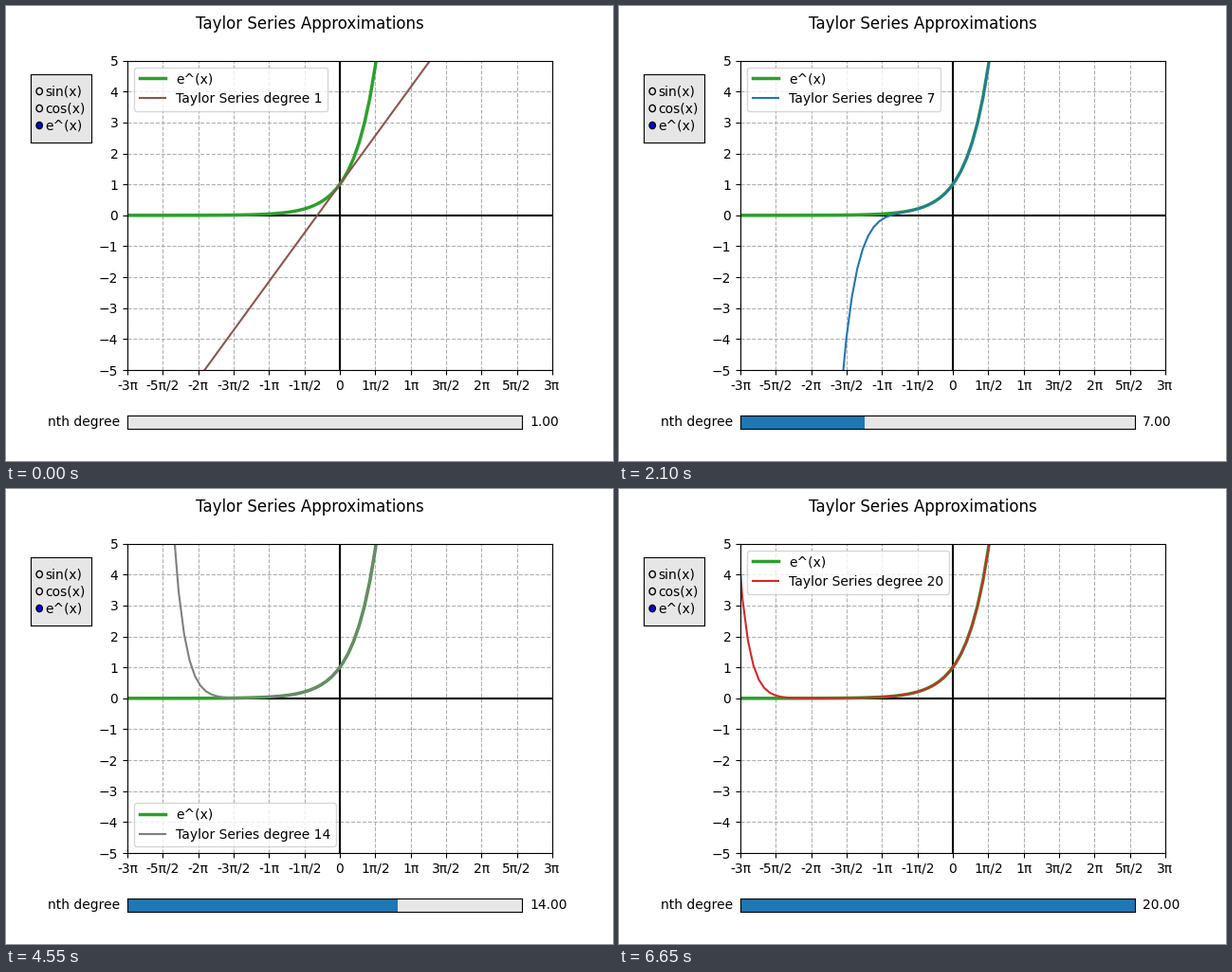
These frames come from a looping animation (640x480 px, 7 s). A matplotlib script:

```python
import math

import matplotlib.pyplot as plt
import numpy as np
from matplotlib.animation import FuncAnimation
from matplotlib.patches import Circle, Rectangle

MAX_DEGREE = 20
GREY = "0.9"

x = np.linspace(-12, 12, 100)


def taylor_exp(degree):
    return sum(x**k / math.factorial(k) for k in range(degree + 1))


def pi_label(halves):
    """Name of a multiple of pi/2."""
    if halves == 0:
        return "0"
    return f"{halves // 2}π" if halves % 2 == 0 else f"{halves}π/2"


def panel(rect):
    """Grey box without ticks, in unit coordinates."""
    box = fig.add_axes(rect, facecolor=GREY)
    box.set(xlim=(0, 1), ylim=(0, 1), xticks=[], yticks=[])
    return box


fig = plt.figure(figsize=(6.4, 4.8), dpi=100)
fig.suptitle("Taylor Series Approximations")

ax = fig.add_axes([0.2, 0.2, 0.7, 0.68])
halves = range(-6, 7)
ax.set(xlim=(-3 * np.pi, 3 * np.pi), ylim=(-5, 5), yticks=range(-5, 6))
ax.set_xticks([h * np.pi / 2 for h in halves], [pi_label(h) for h in halves])
ax.grid(linestyle="--")
ax.axhline(0, color="black")
ax.axvline(0, color="black")
ax.plot(x, np.exp(x), color="C2", linewidth=2.5, label="e^(x)")
approx, = ax.plot([], [])

radio = panel([0.04, 0.7, 0.1, 0.15])
for name, y in zip(("sin(x)", "cos(x)", "e^(x)"), (0.75, 0.5, 0.25)):
    fill = "blue" if name == "e^(x)" else GREY
    radio.add_patch(Circle((0.15, y), 0.05, facecolor=fill, edgecolor="black"))
    radio.text(0.25, y, name, va="center")

slider = panel([0.2, 0.07, 0.65, 0.03])
slider.text(-0.02, 0.5, "nth degree", ha="right", va="center")
value = slider.text(1.02, 0.5, "", va="center")
bar = slider.add_patch(Rectangle((0, 0), 0, 1, facecolor="C0"))


def update(frame):
    degree = frame + 1
    approx.set_data(x, taylor_exp(degree))
    approx.set_color(f"C{max(degree + 3, 5) % 10}")
    approx.set_label(f"Taylor Series degree {degree}")
    # Even polynomials rise through the upper left corner until the last one.
    blocked = degree % 2 == 0 and degree < MAX_DEGREE
    ax.legend(loc="lower left" if blocked else "upper left")
    bar.set_width((degree - 1) / (MAX_DEGREE - 1))
    value.set_text(f"{degree:.2f}")


anim = FuncAnimation(fig, update, frames=MAX_DEGREE, interval=350,
                     init_func=lambda: update(0), repeat=True, repeat_delay=0)

plt.show()
```
